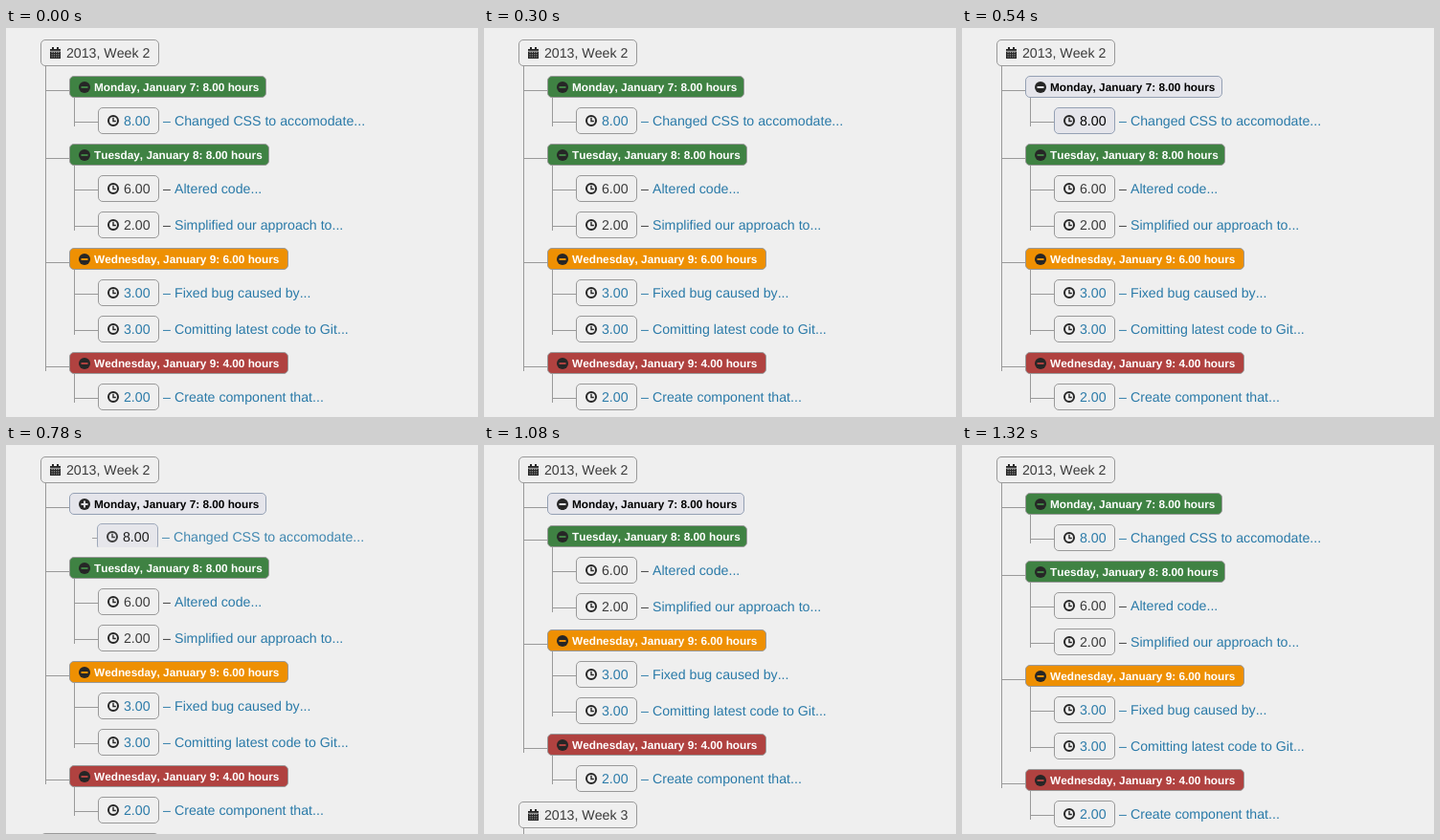
These frames come from a looping animation (493 px wide and 407 px high, 1620 ms). An HTML page:

```html
<!DOCTYPE html>
<html lang="en">
<head>
<meta charset="utf-8">
<title>Timesheet tree</title>
<style>
  html, body { margin: 0; width: 100%; height: 100%; overflow: hidden; background: #efefef; }
  svg { display: block; width: 493px; height: 407px; }
  text {
    font: 14.17px "Liberation Sans", Arial, sans-serif;
    font-kerning: none;
    text-rendering: geometricPrecision;
  }
  .badge text { font-size: 11.8px; font-weight: bold; }
  .line { fill: none; stroke: #999; }

  .node { --bg0: #efefef; --ink0: #3a3a3a; --bg: var(--bg0); --ink: var(--ink0); --edge: #999; }
  .node > rect { fill: var(--bg); stroke: var(--edge); }
  .node > text { fill: var(--ink); }
  .green { --bg0: #3f8243; --ink0: #fff; }
  .orange { --bg0: #ee9003; --ink0: #fff; }
  .red { --bg0: #b04240; --ink0: #fff; }
  .linked { --ink0: #2a7aa8; }
  .link { fill: #2a7aa8; }
  .dark { fill: #3a3a3a; }
  .solid { fill: #262626; }
  .ring { fill: none; stroke: #262626; stroke-width: 2; }
  .cut { fill: none; stroke: var(--bg); stroke-width: 2; }

  .week, .monday, .tuesday, .below, .entry, .stub, .plus { animation: 1620ms step-end infinite; }
  .week { animation-name: week; }
  .monday { animation-name: monday; }
  .tuesday { animation-name: tuesday; }
  .below { animation-name: below; }
  .entry { animation-name: entry; }
  .stub { animation-name: stub; }
  .plus { animation-name: plus; }

  /* highlight while the pointer rests on a branch */
  @keyframes week {
    0%, 7.407%, 100% { --bg: var(--bg0); --ink: var(--ink0); --edge: #999; }
    3.703% { --bg: #e5e5eb; --ink: #000; --edge: #94a0b4; }
  }
  @keyframes monday {
    0%, 18.518%, 81.481%, 100% { --bg: var(--bg0); --ink: var(--ink0); --edge: #999; }
    3.703%, 33.333% { --bg: #e5e5eb; --ink: #000; --edge: #94a0b4; }
  }
  @keyframes tuesday {
    0%, 7.407%, 29.629%, 100% { --bg: var(--bg0); --ink: var(--ink0); --edge: #999; }
    3.703%, 25.925% { --bg: #e5e5eb; --ink: #000; --edge: #94a0b4; }
  }

  /* Monday's entry folds away and comes back */
  @keyframes below {
    0%, 77.777%, 100% { transform: none; }
    48.148% { transform: translateY(-4px); }
    51.851% { transform: translateY(-21px); }
    55.555% { transform: translateY(-37px); }
    70.37% { transform: translateY(-25px); }
    74.074% { transform: translateY(-7px); }
  }
  @keyframes entry {
    0%, 77.777%, 100% { transform: none; opacity: 1; }
    48.148% { transform: translate(-1px, -1px); opacity: .89; }
    51.851% { transform: translate(-3px, -6px); opacity: .43; }
    55.555% { transform: translate(-5px, -10px); opacity: 0; }
    70.37% { transform: translate(-3px, -7px); opacity: .33; }
    74.074% { transform: translate(-1px, -2px); opacity: .81; }
  }
  @keyframes stub {
    0%, 77.777%, 100% { visibility: visible; }
    48.148% { visibility: hidden; }
  }
  @keyframes plus {
    0%, 66.666%, 100% { visibility: hidden; }
    44.444% { visibility: visible; }
  }
</style>
</head>
<body>
<svg id="stage" viewBox="0 0 493 407"></svg>
<script>
  const line = d => `<path class="line" d="${d}"/>`;

  const box = (x, y, w, h) =>
    `<rect x="${x + .5}" y="${y + .5}" width="${w - 1}" height="${h - 1}" rx="4.5"/>`;

  const calendar = (x, y) => {
    let cells = '';
    for (let row = 0; row < 3; row++)
      for (let col = 0; col < 4; col++)
        cells += `M${x + 1.5 + col * 2.3} ${y + 5.5 + row * 2.3}h1.2`;
    return `<path class="solid" d="M${x} ${y + 2}h11v10h-11zM${x + 2} ${y}h2v3h-2zM${x + 7} ${y}h2v3h-2z"/>
      <path class="cut" style="stroke-width:.7" d="M${x} ${y + 4.3}h11${cells}"/>`;
  };

  const clock = (x, y) =>
    `<circle class="ring" cx="${x}" cy="${y}" r="5"/>
     <path class="ring" style="stroke-width:1.4" d="M${x} ${y - 3.3}V${y + .5}H${x + 2.8}"/>`;

  const toggle = (x, y, foldable) =>
    `<circle class="solid" cx="${x}" cy="${y}" r="6"/><path class="cut" d="M${x - 3.5} ${y}h7"/>` +
    (foldable ? `<path class="cut plus" d="M${x} ${y - 3.5}v7"/>` : '');

  const week = (y, label, group) =>
    `<g class="node ${group}">${box(36, y, 124, 28)}${calendar(46, y + 8)}
     <text x="63" y="${y + 19}">${label}</text></g>`;

  const badge = (y, width, label, style, foldable = false) =>
    line(`M41 ${y + 15.5}h25`) +
    `<g class="node badge ${style}">${box(66, y, width, 23)}${toggle(82, y + 12, foldable)}
     <text x="92" y="${y + 16}">${label}</text></g>`;

  const entry = (y, hours, note, style, dash = 'link') =>
    `<g class="node ${style}">${box(96, y, 64, 28)}${clock(112, y + 14)}
     <text x="123" y="${y + 19}">${hours}</text></g>
     <text class="${dash}" x="164" y="${y + 19}">–</text>
     <text class="link" x="176" y="${y + 19}">${note}...</text>`;

  // Connector from a branch at y down to entries spaced 38px apart
  const branch = (y, count) => {
    let d = `M71.5 ${y}v${count * 38 - 8}`;
    for (let i = 0; i < count; i++) d += `M71 ${y + 25.5 + i * 38}h25`;
    return line(d);
  };

  document.getElementById('stage').innerHTML = `
    ${line('M41.5 40V111')}
    ${week(12, '2013, Week 2', 'week')}
    <g class="stub">${line('M71.5 73v30M71 98.5h20')}</g>
    <g class="entry">${line('M91 98.5h5')}${entry(83, '8.00', 'Changed CSS to accomodate', 'linked monday')}</g>
    ${badge(50, 206, 'Monday, January 7: 8.00 hours', 'green monday', true)}
    <g class="below">
      <rect y="111" width="493" height="400" fill="#efefef"/>
      ${line('M41.5 111V359M41.5 438v60')}
      ${branch(144, 2)}
      ${badge(121, 209, 'Tuesday, January 8: 8.00 hours', 'green tuesday')}
      ${entry(154, '6.00', 'Altered code', 'tuesday', 'dark')}
      ${entry(192, '2.00', 'Simplified our approach to', 'tuesday', 'dark')}
      ${branch(253, 2)}
      ${badge(230, 229, 'Wednesday, January 9: 6.00 hours', 'orange week')}
      ${entry(263, '3.00', 'Fixed bug caused by', 'linked week')}
      ${entry(301, '3.00', 'Comitting latest code to Git', 'linked week')}
      ${branch(362, 1)}
      ${badge(339, 229, 'Wednesday, January 9: 4.00 hours', 'red week')}
      ${entry(372, '2.00', 'Create component that', 'linked week')}
      ${week(410, '2013, Week 3', '')}
    </g>`;
</script>
</body>
</html>
```
